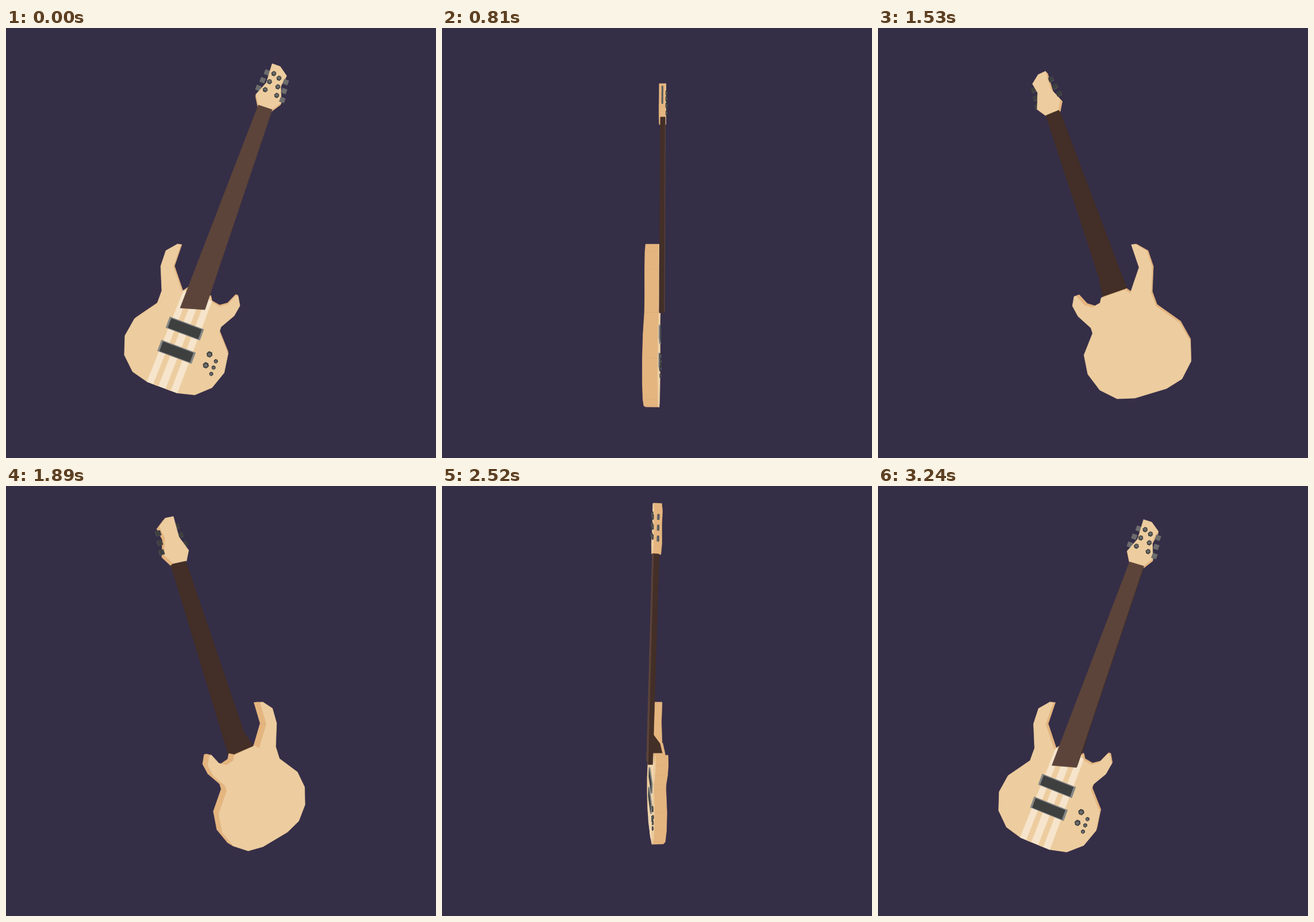
An HTML page that plays this animation: 748 px wide and 748 px high, repeating every 3330 ms.

```html
<!DOCTYPE html>
<html lang="en">
<head>
<meta charset="utf-8">
<title>Spinning bass</title>
<style>
  html, body { margin: 0; width: 100%; height: 100%; overflow: hidden; background: #352e47; }
  svg { display: block; width: 100%; height: 100%; }
  polygon { stroke-width: .7; stroke-linejoin: round; }
</style>
</head>
<body>
<svg id="stage" viewBox="0 0 748 748"></svg>
<script>
const CX = 374, CY = 375, CAMERA = 828;
const STEP_MS = 90, STEPS = 37;
const rad = degrees => degrees * Math.PI / 180;
const STEP_ANGLE = rad(9.83), TILT = rad(20.5);
const BODY_Z = 5.3, HEAD_Z = 14.5, NECK_Z = 13.5;
const WOOD = '#edcd9f', WOOD_EDGE = '#e5b57f', MAPLE = '#f6e5cc';
const ROSEWOOD = '#5c443a', ROSEWOOD_EDGE = '#432f27';
const METAL = '#6d6d6e', METAL_EDGE = '#55585a', DARK = '#3e4040', CHROME = '#868786';

// Model point that appears at (x, y) in the front view when it lies at depth ref.
const at = (x, y, z, ref = z) => {
  const k = 1 - ref / CAMERA;
  return [(x - CX) * k, (y - CY) * k, z];
};
const face = (points, color) => ({ points, color });
const flat = (outline, z, color) => face(outline.map(([x, y]) => at(x, y, z)), color);
const repeat = (n, make) => Array.from({ length: n }, (_, i) => make(i));
const row = (n, x, y, dx, dy) => repeat(n, i => [x + i * dx, y + i * dy]);
const polar = (cx, cy, r, a) => [cx + r * Math.cos(a), cy + r * Math.sin(a)];
const mix = (a, b, t) => a.map((v, i) => v + (b[i] - v) * t);

// Quadratic curve cut into three straight facets.
const facets = (from, bend, to) => repeat(4, i =>
  mix(mix(from, bend, i / 3), mix(bend, to, i / 3), i / 3));

// Outlines run counterclockwise; backZ may vary along the outline.
function prism(outline, backZ, frontZ, color, edge, backColor = color) {
  const front = outline.map(([x, y]) => at(x, y, frontZ));
  const back = outline.map(([x, y], i) => at(x, y, backZ[i] ?? backZ, frontZ));
  const sides = front.map((p, i) => {
    const j = (i + 1) % front.length;
    return face([p, back[i], back[j], front[j]], edge);
  });
  return { sides, caps: [face(front, color), face([...back].reverse(), backColor)] };
}

function box(cx, cy, halfW, halfH) {
  const c = Math.cos(TILT), s = Math.sin(TILT);
  return [[-1, -1], [-1, 1], [1, 1], [1, -1]].map(([a, b]) =>
    [cx + a * halfW * c - b * halfH * s, cy + a * halfW * s + b * halfH * c]);
}

const hexagon = (cx, cy, r) => repeat(6, i => polar(cx, cy, r, TILT - rad(60) * i));

function knob([x, y], r, base) {
  const top = base + 1.8;
  const part = prism(hexagon(x, y, r), base, top, DARK, DARK);
  part.caps.push(flat(hexagon(x, y, r * .6), top, METAL));
  return part;
}

function pickup([x, y]) {
  const top = BODY_Z + 2;
  const part = prism(box(x, y, 31.5, 9.8), BODY_Z, top, CHROME, CHROME);
  part.caps.push(flat(box(x, y, 28, 8.6), top, DARK));
  return part;
}

const peg = ([x, y]) => prism(box(x, y, 4, 3.8), 7, 9.5, METAL, METAL_EDGE, DARK);

// Lower bout: symmetric about the neck axis, widest near 85 degrees from the tail.
function boutPoint(side, i) {
  const spread = 22 + 21 * i;
  const r = 92.5 - 17.5 * ((spread - 85) / 63) ** 2;
  return polar(296, 560, r, TILT + rad(90 + side * spread));
}

const body = prism([
  ...facets([298, 376], [260, 381], [271, 457]),
  [263, 479],
  ...repeat(5, i => boutPoint(1, 4 - i)),
  ...repeat(5, i => boutPoint(-1, i)),
  [371, 529],
  ...facets([374, 520], [418, 490], [404, 467]),
  ...facets([400, 466], [378, 497], [358, 477]),
  [356, 468], [315, 453], [306, 459], [291, 415], [304, 377]
], -16, BODY_Z, WOOD, WOOD_EDGE);

const tailL = boutPoint(1, 0), tailR = boutPoint(-1, 0);
const neckL = [309, 457], neckR = [358, 475];
const band = (a, b, color) => flat([
  mix(neckL, neckR, a), mix(tailL, tailR, a), mix(tailL, tailR, b), mix(neckL, neckR, b)
], BODY_Z, color);
body.caps.push(band(0, 1, MAPLE), ...repeat(2, i => band(.21 + .41 * i, .37 + .41 * i, WOOD)));

const neckTopL = [439, 134], neckTopR = [463, 142];
const neck = prism([neckTopL, [303, 487], [346, 490], neckTopR],
  [4.7, BODY_Z, BODY_Z, 4.7], NECK_Z, ROSEWOOD, ROSEWOOD_EDGE, ROSEWOOD_EDGE);

const heelPoint = (x, y, z) => at(x, y, z, BODY_Z);
const ridgeL = heelPoint(324, 432, BODY_Z), ridgeR = heelPoint(364, 440, BODY_Z);
const endL = heelPoint(315, 454, -11), endR = heelPoint(354, 467, -11);
const heel = {
  sides: [
    [ridgeL, endL, heelPoint(315, 454, BODY_Z)],
    [ridgeR, heelPoint(354, 467, BODY_Z), endR],
    [ridgeR, endR, endL, ridgeL]
  ].map(points => face(points, ROSEWOOD_EDGE)),
  caps: []
};

const head = prism([
  [463, 62], [453, 95], [435, 115], neckTopL, neckTopR, [479, 130], [478, 100],
  [488, 83], [477, 67]
], 2, HEAD_Z, WOOD, WOOD_EDGE);

const pegsLeft = row(3, 454, 77, -7.5, 13.5).map(peg);
const pegsRight = row(3, 487, 94, -3, 15.5).map(peg);
const posts = [...row(3, 466, 79, -7.5, 14), ...row(3, 475, 87, -2, 15)]
  .map(p => knob(p, 4, HEAD_Z));
const fittings = [
  ...row(2, 311, 523, -14.5, 40.5).map(pickup),
  ...row(2, 354, 568, -6.5, 19).map(p => knob(p, 5, BODY_Z)),
  ...row(3, 365, 580, -4, 11).map(p => knob(p, 3.3, BODY_Z))
];

function drawPart({ sides, caps }, cos, sin) {
  const project = ({ points, color }) => {
    let depth = 0, area = 0;
    const shown = points.map(([x, y, z]) => {
      const toward = z * cos - x * sin, scale = CAMERA / (CAMERA - toward);
      depth += toward / points.length;
      return [CX + (x * cos + z * sin) * scale, CY + y * scale];
    });
    shown.forEach(([x, y], i) => {
      const [nx, ny] = shown[(i + 1) % shown.length];
      area += x * ny - nx * y;
    });
    return { shown, color, depth, visible: area < 0 };
  };
  return [...sides.map(project).sort((a, b) => a.depth - b.depth), ...caps.map(project)]
    .filter(f => f.visible)
    .map(f => `<polygon fill="${f.color}" stroke="${f.color}" points="${
      f.shown.map(p => p.map(v => v.toFixed(2))).join(' ')}"/>`)
    .join('');
}

// Back-to-front order of the parts for the current view.
function sceneOrder(cos, sin) {
  const frontSeen = cos * CAMERA > BODY_Z, leftNear = sin > 0;
  const core = leftNear ? [heel, body] : [body, heel];
  return [
    ...(leftNear ? pegsRight : pegsLeft),
    ...(frontSeen ? [head] : [...posts, head]),
    ...(leftNear ? pegsLeft : pegsRight),
    ...(frontSeen ? posts : []),
    ...(frontSeen ? [...core, neck, ...fittings] : [...fittings, neck, ...core])
  ];
}

const stage = document.getElementById('stage');

function render(time) {
  const angle = Math.floor(time / STEP_MS) % STEPS * STEP_ANGLE;
  const cos = Math.cos(angle), sin = Math.sin(angle);
  stage.innerHTML = sceneOrder(cos, sin).map(part => drawPart(part, cos, sin)).join('');
}

const start = performance.now();
function tick() {
  render(performance.now() - start);
  requestAnimationFrame(tick);
}
tick();
</script>
</body>
</html>
```
